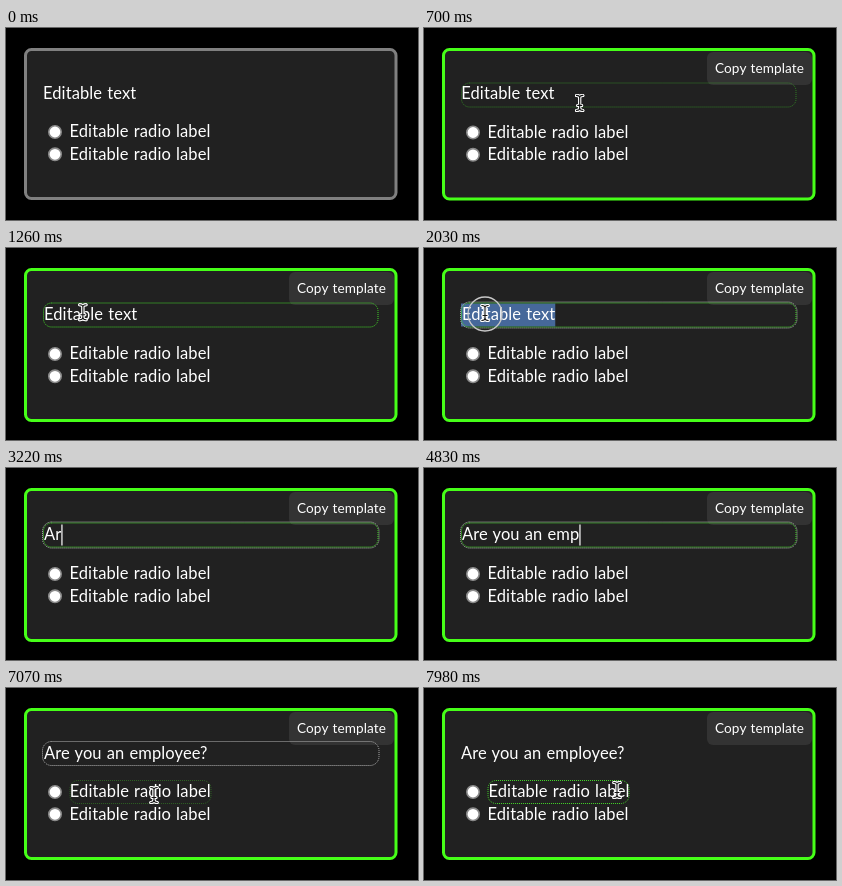
Animation of 412 by 192 pixels, one loop 8000 ms. Source, as an HTML page:

```html
<!DOCTYPE html>
<html lang="en">
<head>
<meta charset="utf-8">
<title>Editable template</title>
<style>
  html, body { margin: 0; width: 100%; height: 100%; overflow: hidden; background: #000; }
  svg { display: block; width: 412px; height: 192px; }
  text { font: 16.5px Lato, "Open Sans", sans-serif; fill: #fff; letter-spacing: .1px; word-spacing: .8px; white-space: pre; }
  #copy text { font-size: 13.6px; }
  .dots { fill: none; stroke-width: 1; stroke-dasharray: 1 1; }
  .radio { fill: #fff; stroke: #8a8a8a; stroke-width: 1.6; }
</style>
</head>
<body>
<svg viewBox="0 0 412 192">
  <rect id="card" x="19.5" y="21.5" width="370.5" height="149" rx="6" fill="#212121" stroke-width="3"/>
  <g id="copy">
    <rect x="283" y="24" width="105" height="33" rx="6" fill="#333"/>
    <text x="291" y="45">Copy template</text>
  </g>
  <rect id="selection" x="37" y="55.5" height="23" fill="#46689a"/>
  <rect id="focus" class="dots" x="36.5" width="336.5" rx="9" stroke="#b4b4b4"/>
  <rect id="hover" class="dots" x="37.5" y="55" width="334.5" height="24" rx="8" stroke="#43d828"/>
  <text id="field"></text>
  <path id="caret" stroke="#fff" stroke-width="1.2"/>
  <g id="options">
    <circle class="radio" cx="49" cy="104" r="6.2"/>
    <circle class="radio" cx="49" cy="126.3" r="6.2"/>
    <rect id="labelHover" class="dots" x="64" y="92.5" width="141" height="23" rx="8" stroke="#43d828"/>
    <text id="label" y="109">Editable radio label</text>
    <text x="63.5" y="131.5">Editable radio label</text>
  </g>
  <circle id="ring" fill="none" stroke="#c8c8c8" stroke-width="1.3"/>
  <g id="cursor" stroke-linecap="round" stroke-linejoin="round">
    <g id="beam" fill="none">
      <path id="beamShape" d="M-3.2 -7.5Q0 -7.5 0 -5V5Q0 7.5 -3.2 7.5M3.2 -7.5Q0 -7.5 0 -5V5Q0 7.5 3.2 7.5M-2 2.5H2" stroke="#fff" stroke-width="3"/>
      <use href="#beamShape"/>
      <path id="beamCore" stroke="#111" stroke-width="1.1"/>
    </g>
    <path id="arrow" d="M0 0V14L3.3 11L5.7 16L8 15L5.7 10H10Z" fill="#111" stroke="#fff"/>
  </g>
</svg>
<script>
const LOOP = 8000, STEP = 70;
const $ = id => document.getElementById(id);
const set = (id, attrs) => {
  for (const k in attrs) $(id).setAttribute(k, attrs[k]);
};
const show = (id, on) => set(id, { opacity: Number(on) });
const ramp = (t, a, b) => {
  const p = Math.min(1, Math.max(0, (t - a) / (b - a)));
  return p * p * (3 - 2 * p);
};
const mix = (a, b, p) => a + (b - a) * p;
const mixColor = (a, b, p) => `rgb(${a.map((v, i) => Math.round(mix(v, b[i], p)))})`;

const REPLACEMENT = "Are you an employee?";
const KEY_TIMES = [2870, 3220, 3290, 3360, 3570, 3710, 3780, 3850, 4130, 4200,
  4340, 4550, 4690, 4830, 4970, 5180, 5530, 5880, 6090, 6510];
const TYPING = 2800;

// time, x, y
const MOVES = [
  [70, 235, 150], [910, 141, 61], [1400, 61, 65], [6790, 61, 65],
  [7070, 148, 107], [7280, 150, 107], [7490, 150, 107], [7980, 193, 102]
];

function pointer(t) {
  let i = 0;
  while (i < MOVES.length - 2 && t >= MOVES[i + 1][0]) i++;
  const [a, x0, y0] = MOVES[i], [b, x1, y1] = MOVES[i + 1];
  const p = ramp(t, a, b);
  return [mix(x0, x1, p), mix(y0, y1, p)];
}

function drawField(t, grow) {
  const typed = KEY_TIMES.filter(k => k <= t).length;
  const content = t < TYPING ? "Editable text" : REPLACEMENT.slice(0, typed);
  const focused = t >= 1820 && t < 7700;
  const inset = Math.max(grow, Number(focused));
  const field = $("field");
  field.textContent = content;
  set("field", { x: 37 + inset, y: 71 + grow });

  const width = content ? field.getComputedTextLength() : 0;
  const selected = t >= 1960 && t < TYPING;
  set("selection", { width: width + 1 });
  show("selection", selected);

  const blink = t >= 5320 && t < 5530;
  const x = 38.6 + width;
  set("caret", { d: `M${x} 56.5V77.5` });
  show("caret", focused && !selected && !blink && t < 7000);

  set("focus", { y: 53.5 + grow * .5, height: 24 + grow * 2 });
  show("focus", focused);
  show("hover", ramp(t, 560, 840) * (1 - ramp(t, 6860, 7035)));
}

function drawCursor(t) {
  const [x, y] = pointer(t);
  const overField = y > 53 && y < 80;
  const overLabel = y > 91 && y < 116 && x > 63 && x < 206;
  const beam = overField || overLabel;
  set("cursor", { transform: `translate(${x} ${y})` });
  show("cursor", t >= 70 && t < TYPING || t >= 6790);
  show("beam", beam);
  show("arrow", !beam);
  set("ring", { cx: x, cy: y + 1, r: mix(12, 17, ramp(t, 1750, 1890)) });
  show("ring", t >= 1750 && t < 2310 ? 1 - ramp(t, 2100, 2310) : 0);
}

function draw(time) {
  const t = Math.floor(time / STEP) * STEP;
  const active = ramp(t, 0, 350);
  const grow = ramp(t, 630, 840) * (1 - ramp(t, 6860, 7000));
  set("card", {
    height: 149 + 2 * grow,
    stroke: mixColor([128, 128, 128], [70, 255, 24], active)
  });
  show("copy", active);
  set("options", { transform: `translate(0 ${2 * grow})` });
  const labelOn = ramp(t, 6960, 7240);
  set("label", { x: 63.5 + labelOn });
  show("labelHover", labelOn);
  drawField(t, grow);
  drawCursor(t);
}

set("beamCore", { d: $("beamShape").getAttribute("d") });
const start = performance.now();
function tick() {
  draw((performance.now() - start) % LOOP);
  requestAnimationFrame(tick);
}
tick();
</script>
</body>
</html>
```
